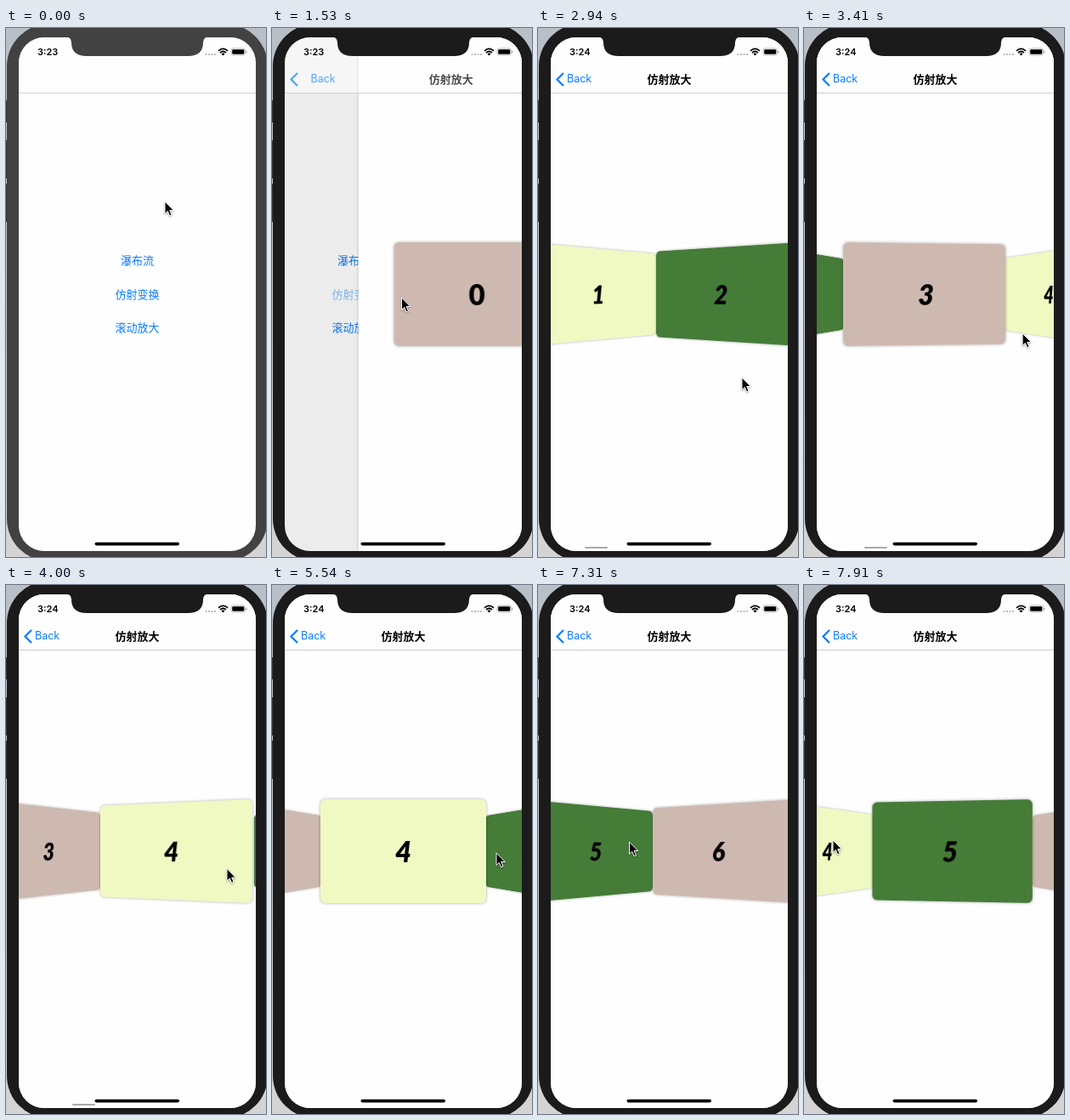
Recreate the animation shown at these times as an HTML page. Size 306x622 px, loop 8 s.

```html
<!DOCTYPE html>
<html lang="zh">
<meta charset="utf-8">
<style>
  html, body { margin: 0; width: 306px; height: 622px; overflow: hidden; }
  body { position: relative; background: linear-gradient(#b9bfc7, #d4d4d4); font-family: Inter, "Noto Sans CJK SC", "Noto Sans CJK", sans-serif; }
  div, svg { position: absolute; }
  #phone { left: 1px; top: -5px; width: 307px; height: 632px; border-radius: 50px; background: #424242; }
  #screen { left: 15px; top: 11px; width: 279px; height: 604px; border-radius: 30px; overflow: hidden; background: #fefefe; }
  #home, #page, #dim { width: 279px; height: 604px; }
  #page { background: #fefefe; box-shadow: -1px 0 2px rgba(0, 0, 0, .22); }
  #dim { background: #000; }
  .label { left: 0; width: 279px; text-align: center; font-size: 13px; line-height: 20px; color: #0a7cff; }
  .card { left: 41.5px; top: 241px; width: 195.3px; height: 122px; border-radius: 6px; box-shadow: 0 0 3px 1px rgba(0, 0, 0, .2);
    font: italic 900 33px/122px Lato, sans-serif; text-align: center; color: #000; }
  #bar { width: 279px; height: 65px; background: rgba(255, 255, 255, .55); border-bottom: 1px solid #cfcfcf; }
  #title { top: 39px; color: #000; font-weight: 600; }
  #back { left: 19px; top: 39px; font-size: 12.5px; line-height: 20px; color: #0a7cff; }
  #clock { left: 22px; top: 10px; font-size: 11px; line-height: 14px; font-weight: 600; }
  #thumb { top: 599px; width: 27px; height: 2px; border-radius: 1px; background: #aaa; }
  svg { left: 0; top: 0; }
</style>
<body>
<div id="phone"></div>
<div id="screen">
  <div id="home">
    <div class="label" style="top:252px">瀑布流</div>
    <div class="label" style="top:292px" id="tapped">仿射变换</div>
    <div class="label" style="top:331px">滚动放大</div>
  </div>
  <div id="dim"></div>
  <div id="page"><div id="thumb"></div></div>
  <div id="bar">
    <div class="label" id="title">仿射放大</div>
    <div id="back">Back</div>
    <div id="clock"></div>
  </div>
</div>
<svg width="306" height="622" fill="none">
  <path id="notch" d="M70 10Q77 11 77 17Q77 33 95 33H214Q232 33 232 17Q232 11 239 10Z"/>
  <path id="chevron" d="M30 53L22.5 60.5L30 68" stroke="#0a7cff" stroke-width="2.2"/>
  <path d="M0 85V111M0 132V177M0 183V228" stroke="#333" stroke-width="2"/>
  <path d="M234.5 31H247" stroke="#bbb" stroke-width="2" stroke-dasharray="2 1.5"/>
  <path d="M250 26.8Q255.5 21.8 261 26.8M252 29Q255.5 26 259 29" stroke="#000" stroke-width="1.7"/>
  <path d="M253.4 30.2Q255.5 28.6 257.6 30.2L255.5 32.4Z" fill="#000"/>
  <rect x="265" y="24" width="16.5" height="8" rx="2.4" stroke="#aaa" stroke-width=".8"/>
  <rect x="266.2" y="25.2" width="14.1" height="5.6" rx="1.4" fill="#000"/>
  <path d="M283 26.8V29.4" stroke="#aaa" stroke-width="1.2"/>
  <rect x="104.5" y="604.8" width="99.5" height="3.6" rx="1.8" fill="#000"/>
  <path id="cursor" d="M0 0V14.5L3.3 11.4L5.6 16.8L8 15.8L5.7 10.5H10.3Z" fill="#000" stroke="#fff" stroke-width="1"
    style="filter:drop-shadow(0 1px 1px rgba(0,0,0,.35))"/>
</svg>
<script>
const LOOP = 8000, STEP = 118, PITCH = 144.3, HALF = 97.65, DEPTH = 297.6;
const COLORS = ['#ceb9b1', '#f0f9c1', '#457c38'];
const el = id => document.getElementById(id);
const clamp = v => Math.min(1, Math.max(0, v));

// time, cursor x, cursor y
const cursorKeys = [
  [236, 187, 204], [1062, 152, 331], [1298, 152, 331], [1534, 152.5, 317], [1888, 152.5, 318], [2124, 240, 558],
  [2360, 238, 552], [2780, 115, 480], [2950, 240, 411], [3400, 257, 360], [4012, 260, 333.5], [4700, 264, 315],
  [5664, 264, 315], [5900, 120, 310], [6136, 282, 315], [6372, 282, 315], [6490, 264, 315], [6726, 100, 310],
  [7080, 25, 302], [7198, 25, 302], [7434, 190, 302], [7552, 14, 300], [7788, 14, 300], [7906, 34, 300]
];
// time, scroll position in cards
const scrollKeys = [
  [5664, 4], [5782, 4.35], [5900, 4.8], [6018, 4.97], [6136, 5], [6372, 5], [6490, 5.25], [6608, 5.6],
  [6726, 5.85], [6844, 5.96], [7080, 6], [7198, 6], [7316, 5.6], [7434, 5.15], [7552, 5], [7788, 5], [7906, 4.88]
];

function sample(keys, t) {
  const i = keys.findIndex(k => k[0] > t);
  if (i === 0) return keys[0].slice(1);
  if (i < 0) return keys[keys.length - 1].slice(1);
  const a = keys[i - 1], b = keys[i], f = (t - a[0]) / (b[0] - a[0]);
  return a.slice(1).map((v, j) => v + (b[j + 1] - v) * f);
}

// a drag, then a fling that decays towards card 4, then short flicks
function scrollAt(t) {
  if (t < 2780) return .6 * clamp((t - 2360) / 420) ** 3;
  if (t < 5500) return 4 - 2.42 * Math.exp((2950 - t) / 490);
  return sample(scrollKeys, t)[0];
}

// critically damped spring
function pushAt(t) {
  const x = Math.max(0, t - 1403) * .01826;
  return t > 1850 ? 1 : 1 - (1 + x) * Math.exp(-x);
}

const cards = Array.from({ length: 9 }, (_, i) => {
  const card = document.createElement('div');
  card.className = 'card';
  card.textContent = i;
  card.style.background = COLORS[i % 3];
  if (!i) card.style.fontStyle = 'normal';
  el('page').insertBefore(card, el('thumb'));
  return card;
});

function placeCard(card, offset) {
  const turn = Math.max(-1, Math.min(1, offset)) * Math.PI / 4;
  const z = -HALF * Math.sin(Math.abs(turn));
  card.style.transform =
    `translateX(${offset * PITCH}px) perspective(${DEPTH}px) translateZ(${z}px) rotateY(${-turn}rad)`;
  card.style.zIndex = 20 - Math.round(Math.abs(offset) * 2);
  card.style.visibility = Math.abs(offset) < 2 ? 'visible' : 'hidden';
}

function draw(t) {
  const push = pushAt(t), rest = 1 - push, scroll = scrollAt(t);
  const bezel = t < 1180 ? '#424242' : '#1b1b1b';
  el('phone').style.background = bezel;
  el('notch').setAttribute('fill', bezel);
  el('clock').textContent = t < 1770 ? '3:23' : '3:24';
  el('tapped').style.opacity = t < 1180 ? 1 : .5;

  el('home').style.transform = `translateX(${-84 * push}px)`;
  el('dim').style.opacity = push * .1;
  el('page').style.transform = `translateX(${279 * rest}px)`;
  el('page').style.display = push > 0 ? 'block' : 'none';
  el('title').style.transform = `translateX(${181 * rest}px)`;
  el('back').style.transform = `translateX(${37 * rest}px)`;
  for (const id of ['title', 'back', 'chevron']) el(id).style.opacity = push;

  cards.forEach((card, i) => placeCard(card, i - scroll));
  el('thumb').style.left = 23 + 10.7 * scroll + 'px';
  el('thumb').style.opacity = t < 2360 ? 0 : clamp((5300 - t) / 350);
  el('cursor').setAttribute('transform', `translate(${sample(cursorKeys, t)})`);
}

function tick(now) {
  draw(Math.floor((now % LOOP + 14) / STEP) * STEP);
  requestAnimationFrame(tick);
}
tick(performance.now());
</script>
</body>
</html>
```
